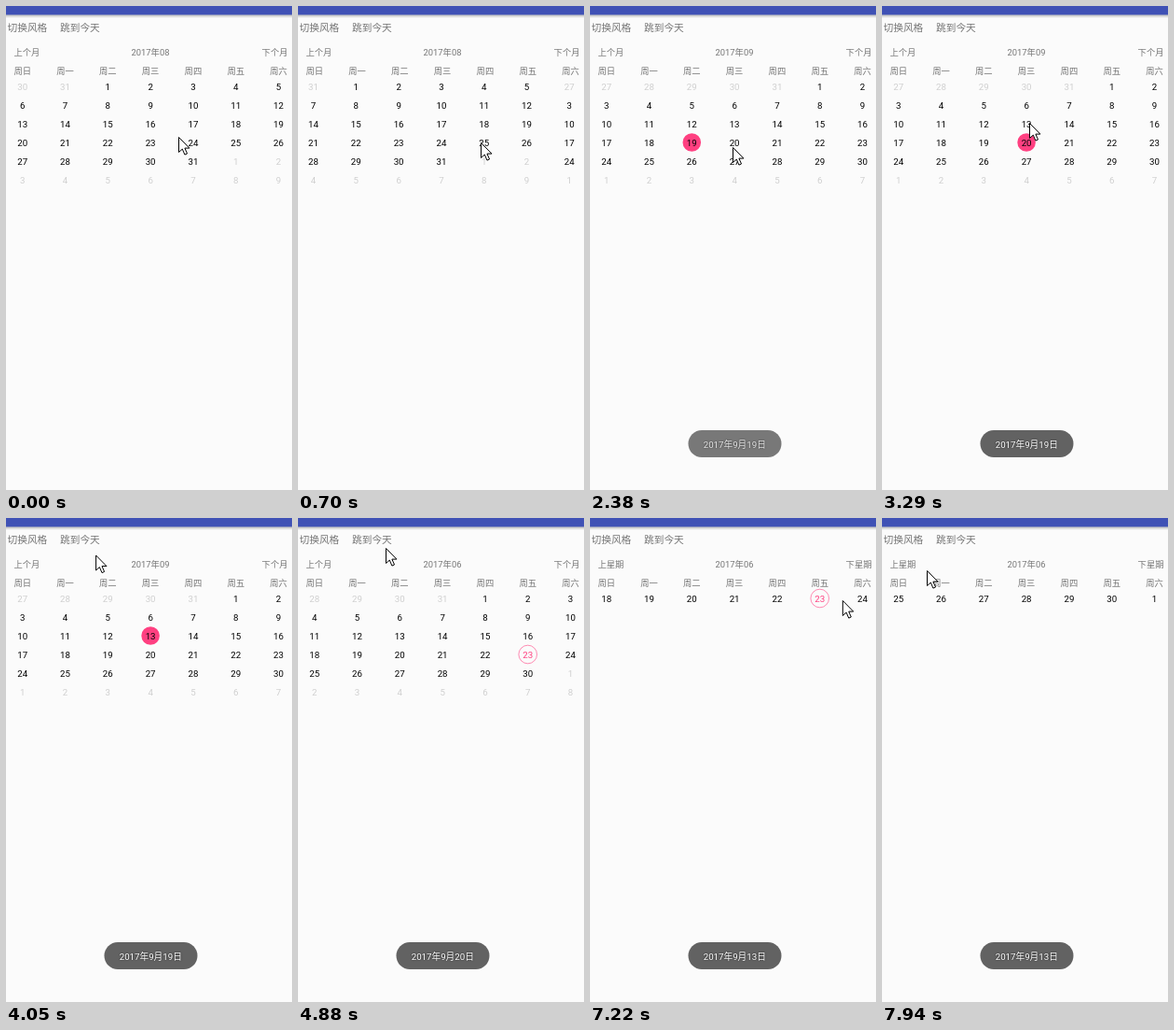
An HTML page with a canvas for the animation above (8 s loop, 307 px wide and 518 px high).

```html
<!DOCTYPE html>
<html lang="zh-CN">
<head>
<meta charset="utf-8">
<title>日历</title>
<style>
html, body { margin: 0; width: 100%; height: 100%; overflow: hidden; background: #fbfbfb; }
canvas { display: block; width: 307px; height: 518px; }
</style>
</head>
<body>
<canvas id="stage"></canvas>
<script>
const W = 307, H = 518, LOOP = 8000;
const COL = 45.8, COL0 = 17.7, ROW = 20, ROW0 = 86.5, PAGE = COL * 7;
const BACK = '#fbfbfb', GREY = '#757575', PALE = '#cfcfcf', PINK = '#ff4081';
const UI = 'Roboto, "Noto Sans CJK SC", "Noto Sans CJK", sans-serif';

// Three days are tapped in turn; their toasts queue up behind each other
const PICKED = [19, 20, 13];
const TAP_START = 1740, TAP_GAP = 880;
const TOAST_START = 2330, TOAST_GAP = 1840;
const JUMP = 4340, WEEKLY = 6010;

const canvas = document.getElementById('stage');
const ctx = canvas.getContext('2d');
const dpr = window.devicePixelRatio || 1;
canvas.width = W * dpr;
canvas.height = H * dpr;

// Where the pointer turns or rests
const stops = [
  { t: 0, x: 185, y: 140 }, { t: 590, x: 206, y: 146 },
  { t: 1100, x: 124, y: 146 }, { t: 1460, x: 124, y: 146 },
  { t: 1760, x: 112, y: 147 }, { t: 2380, x: 153, y: 151 },
  { t: 3290, x: 158, y: 125 }, { t: JUMP, x: 82, y: 20 },
  { t: 4880, x: 94, y: 32 }, { t: 5740, x: 15, y: 20 },
  { t: 6290, x: 15, y: 20 }, { t: 7000, x: 288, y: 88 },
  { t: 7810, x: 194, y: 88 }, { t: 7940, x: 48, y: 56 }
];

function ramp(t, a, b) {
  const k = Math.min(1, Math.max(0, (t - a) / (b - a)));
  return k * k * (3 - 2 * k);
}

// Index of the current item in a regular series, -1 before it starts
const turnOf = (t, start, gap) =>
  Math.max(-1, Math.min(PICKED.length - 1, Math.floor((t - start) / gap)));

function pointerAt(t) {
  const next = stops.findIndex(s => s.t > t);
  if (next < 0) return stops[stops.length - 1];
  const a = stops[next - 1], b = stops[next];
  const k = ramp(t, a.t, b.t);
  return { x: a.x + (b.x - a.x) * k, y: a.y + (b.y - a.y) * k };
}

function text(str, x, y, size, color, align = 'center') {
  ctx.font = size + 'px ' + UI;
  ctx.textAlign = align;
  ctx.fillStyle = color;
  ctx.fillText(str, x, y);
}

function drawDay(date, x, y, color, picked) {
  const today = date.getMonth() === 5 && date.getDate() === 23;
  ctx.beginPath();
  ctx.arc(x, y - 0.5, 9.8, 0, Math.PI * 2);
  if (picked) {
    ctx.fillStyle = PINK;
    ctx.fill();
  } else if (today) {
    color = ctx.strokeStyle = PINK;
    ctx.lineWidth = 0.6;
    ctx.stroke();
  }
  text(date.getDate(), x, y + 3.5, 9.7, color);
}

function drawMonth(month, dx, pick) {
  const lead = new Date(2017, month, 1).getDay();
  for (let i = 0; i < 42; i++) {
    const date = new Date(2017, month, 1 - lead + i);
    const inside = date.getMonth() === month;
    drawDay(date, COL0 + COL * (i % 7) + dx, ROW0 + ROW * Math.floor(i / 7),
      inside ? '#000' : PALE, inside && date.getDate() === pick);
  }
}

function drawWeek(first, dx) {
  for (let i = 0; i < 7; i++)
    drawDay(new Date(2017, 5, first + i), COL0 + COL * i + dx, ROW0, '#000', false);
}

// Slides from one page to the next as k goes from 0 to 1
function turnPage(k, drawOld, drawNew) {
  if (k < 1) drawOld(-k * PAGE);
  if (k > 0) drawNew((1 - k) * PAGE);
}

function drawHeader(month, unit) {
  ctx.fillStyle = '#3f51b5';
  ctx.fillRect(0, 0, W, 9.5);
  const shade = ctx.createLinearGradient(0, 9.5, 0, 13);
  shade.addColorStop(0, 'rgba(0,0,0,.25)');
  shade.addColorStop(1, 'rgba(0,0,0,0)');
  ctx.fillStyle = shade;
  ctx.fillRect(0, 9.5, W, 3.5);
  text('切换风格', 1.5, 27, 10.7, GREY, 'left');
  text('跳到今天', 58, 27, 10.7, GREY, 'left');
  text('上' + unit, 8.5, 53, 9.3, GREY, 'left');
  text('2017年0' + month, 155, 53, 9.4, GREY);
  text('下' + unit, 302.5, 53, 9.3, GREY, 'right');
  [...'日一二三四五六'].forEach((d, i) => text('周' + d, COL0 + COL * i, 73, 9.3, GREY));
}

function drawToast(t) {
  const i = turnOf(t, TOAST_START, TOAST_GAP);
  if (i < 0) return;
  const age = t - TOAST_START - i * TOAST_GAP;
  ctx.save();
  ctx.globalAlpha = Math.min(1, 0.8 + age / 1000);
  ctx.fillStyle = '#626262';
  ctx.beginPath();
  ctx.roundRect(105.5, 454, 100, 29, 14.5);
  ctx.fill();
  ctx.shadowColor = 'rgba(0,0,0,.7)';
  ctx.shadowBlur = 2 * dpr;
  text(`2017年9月${PICKED[i]}日`, 155.3, 472.5, 9.7, '#fff');
  ctx.restore();
}

function drawPointer({ x, y }) {
  const outline = [[0, 0], [0, 16], [3.8, 12.6], [6.4, 18.6], [9, 17.5], [6.4, 11.6], [11.4, 11.6]];
  ctx.beginPath();
  for (const [px, py] of outline) ctx.lineTo(x + 0.5 + px, y + 0.5 + py);
  ctx.closePath();
  ctx.fillStyle = '#fff';
  ctx.fill();
  ctx.strokeStyle = '#000';
  ctx.lineWidth = 1;
  ctx.lineJoin = 'round';
  ctx.stroke();
}

function draw(t) {
  ctx.setTransform(dpr, 0, 0, dpr, 0, 0);
  ctx.fillStyle = BACK;
  ctx.fillRect(0, 0, W, H);

  const swipe = ramp(t, 590, 1050);
  const month = t >= JUMP ? 6 : swipe > 0.5 ? 9 : 8;
  drawHeader(month, t >= WEEKLY ? '星期' : '个月');

  if (t >= WEEKLY) {
    turnPage(ramp(t, 7250, 7790), dx => drawWeek(18, dx), dx => drawWeek(25, dx));
  } else if (t >= JUMP) {
    drawMonth(5, 0);
  } else {
    const pick = PICKED[turnOf(t, TAP_START, TAP_GAP)];
    turnPage(swipe, dx => drawMonth(7, dx), dx => drawMonth(8, dx, pick));
  }

  drawToast(t);
  drawPointer(pointerAt(t));
}

const start = performance.now();
function frame() {
  draw((performance.now() - start) % LOOP);
  requestAnimationFrame(frame);
}
frame();
</script>
</body>
</html>
```
